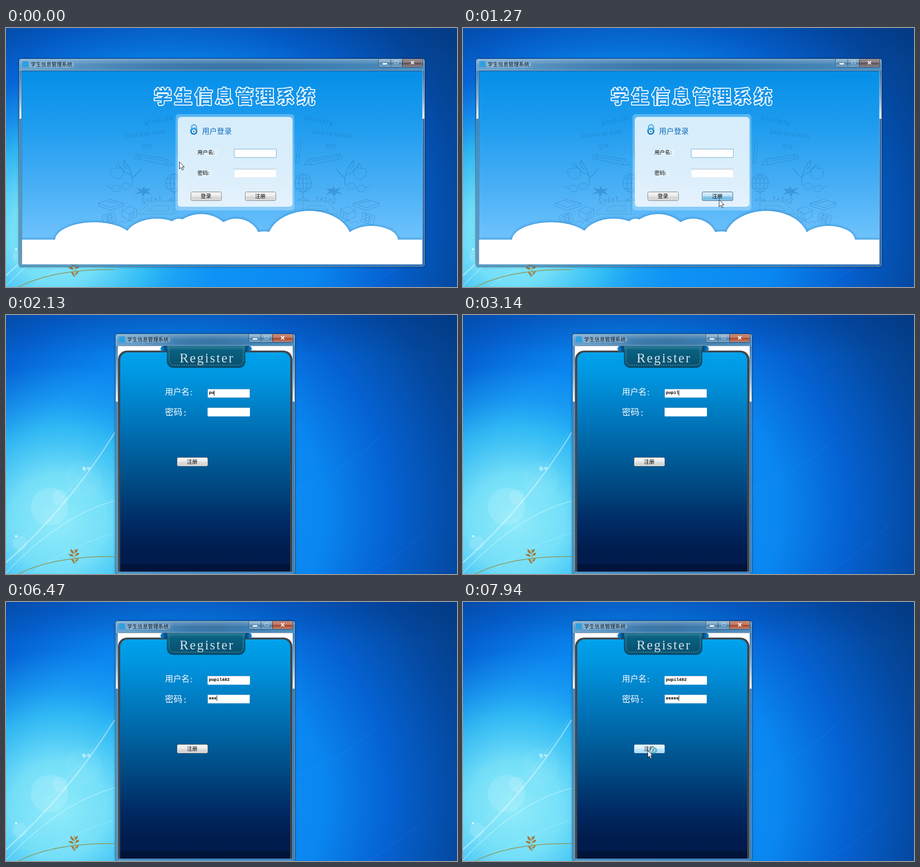
Animation, 987 px wide and 568 px high, one loop 8000 ms. Source, as an HTML page with a canvas:

```html
<!DOCTYPE html>
<html lang="zh">
<head>
<meta charset="utf-8">
<style>
html, body { margin: 0; width: 987px; height: 568px; overflow: hidden; }
canvas { display: block; }
</style>
</head>
<body>
<canvas id="stage" width="987" height="568"></canvas>
<script>
const c = document.getElementById('stage').getContext('2d');
const LOOP = 8000, SWITCH = 1340, TAB = 5310, BLINK = 530;
const CJK = '"Noto Sans CJK SC", "Noto Sans CJK", sans-serif';
const APP = '学生信息管理系统', USER = 'pupil482';
const userKeys = [1960, 2130, 2740, 2970, 3140, 4680, 4910, 5140];
const passKeys = [6180, 6320, 6470, 6720, 6850];
// time, x, y of the pointer tip
const path = [[70, 379, 293], [150, 370, 286], [300, 396, 270], [500, 480, 320], [700, 556, 374],
  [780, 560, 376], [1440, 560, 376], [1660, 592, 330], [1960, 548, 239], [2750, 548, 239],
  [7400, 607, 307], [7820, 404, 325]];

function shade(g, stops) {
  stops.forEach(([at, color]) => g.addColorStop(at, color));
  return g;
}
const vertical = (y0, y1, ...stops) => shade(c.createLinearGradient(0, y0, 0, y1), stops);
const horizontal = (x0, x1, ...stops) => shade(c.createLinearGradient(x0, 0, x1, 0), stops);
const radial = (x, y, r, ...stops) => shade(c.createRadialGradient(x, y, 0, x, y, r), stops);

function rect(x, y, w, h, fill) {
  c.fillStyle = fill;
  c.fillRect(x, y, w, h);
}
function box(x, y, w, h, r, fill, stroke) {
  c.beginPath();
  c.roundRect(x, y, w, h, r);
  if (fill) { c.fillStyle = fill; c.fill(); }
  if (stroke) { c.strokeStyle = stroke; c.lineWidth = 1; c.stroke(); }
}
function text(s, x, y, font, color, align = 'left') {
  c.font = font;
  c.fillStyle = color;
  c.textAlign = align;
  c.textBaseline = 'middle';
  c.fillText(s, x, y);
}
function line(d, color, width = 1) {
  c.strokeStyle = color;
  c.lineWidth = width;
  c.stroke(new Path2D(d));
}
function disc(x, y, r, fill) {
  c.beginPath();
  c.arc(x, y, r, 0, 7);
  c.fillStyle = fill;
  c.fill();
}

function desktop() {
  rect(0, 0, 987, 568, radial(360, 430, 800, [0, '#129df8'], [.42, '#0a86f0'], [.6, '#0562d2'],
    [.8, '#04489f'], [1, '#053878']));
  rect(0, 0, 987, 568, radial(115, 455, 350, [0, 'rgba(150,240,250,.95)'], [.3, 'rgba(125,230,249,.92)'],
    [.6, 'rgba(60,200,245,.75)'], [.8, 'rgba(40,175,245,.4)'], [1, 'rgba(40,165,245,0)']));
  rect(0, 0, 987, 90, vertical(0, 90, [0, 'rgba(0,50,130,.25)'], [1, 'rgba(0,50,130,0)']));
  [[95, 420, 41], [118, 400, 17], [30, 500, 16], [170, 360, 40]].forEach(([x, y, r], i) =>
    disc(x, y, r, `rgba(255,255,255,${i < 3 ? .13 : .04})`));
  disc(22, 485, 2, '#fff');
  for (let i = 0; i < 22; i++) disc(i * 61 % 235, 395 + i * 47 % 120, .7, 'rgba(255,255,255,.5)');
  const beam = 'M0 543Q138 420 238 258';
  line(beam, 'rgba(255,255,255,.22)', 4);
  line(beam, 'rgba(255,255,255,.4)', 1.2);
  line('M0 520Q150 390 230 258', 'rgba(255,255,255,.18)');
  line('M0 566Q120 438 238 408', 'rgba(255,255,255,.4)', 1.3);
  line('M60 566Q130 510 238 478', 'rgba(255,255,255,.3)');
  line('M634 381Q750 340 822 262M790 568Q890 510 930 460', 'rgba(90,190,255,.18)');
  c.fillStyle = 'rgba(235,255,255,.5)';
  c.fill(new Path2D('M167 333Q176 330 175 341Q166 344 167 333M176 336Q184 329 185 338Q180 342 176 336'));
  line('M25 569Q105 528 238 530', '#8d9c62', 1.6);
  line('M150 512L152 545', '#a08a45');
  c.fillStyle = '#a8763a';
  c.fill(new Path2D('M149 524Q140 522 141 513Q148 516 149 524M151 522Q150 514 157 513Q158 519 151 522' +
    'M148 530Q140 530 137 525Q146 522 148 530M152 528Q154 520 160 522Q159 528 152 528' +
    'M149 541Q144 540 142 535Q150 535 149 541M152 541Q153 535 159 533Q158 540 152 541M150 546Q145 542 145 539Q152 541 150 546'));
}

// Glass window frame with caption and its three buttons
function frame(x, y, w, h, shineY, closeTop, closeBottom) {
  c.save();
  c.shadowColor = 'rgba(0,15,50,.45)';
  c.shadowBlur = 6;
  box(x, y, w, h, 6, 'rgba(60,125,180,.6)');
  c.restore();
  c.save();
  box(x, y, w, h, 6);
  c.clip();
  rect(x, y, w, 27, horizontal(x, x + w, [0, '#6aa3cf'], [.25, '#4a86b6'], [.4, '#3c7aac'],
    [.55, '#3a76a6'], [.7, '#3d7cae'], [1, '#4c8cbe']));
  rect(x, y, w, 12, vertical(y, y + 12, [0, 'rgba(255,255,255,.28)'], [1, 'rgba(255,255,255,.04)']));
  const shine = vertical(y + 26, shineY, [0, 'rgba(255,255,255,.05)'], [.6, 'rgba(255,255,255,.45)'], [1, 'rgba(255,255,255,.95)']);
  rect(x, y + 26, 7, shineY - y - 26, shine);
  rect(x + w - 7, y + 26, 7, shineY - y - 26, shine);
  c.shadowColor = 'rgba(205,228,245,.6)';
  c.shadowBlur = 10;
  box(x + 24, y + 8, 96, 11, 5, 'rgba(195,222,242,.4)');
  c.restore();
  box(x + .5, y + .5, w - 1, h - 1, 6, null, '#1c3d5e');
  box(x + 1.5, y + 1.5, w - 3, h - 3, 5, null, 'rgba(225,245,255,.6)');
  box(x + 5.5, y + 25.5, w - 11, h - 31, 1, null, 'rgba(215,240,255,.55)');
  box(x + 6.5, y + 26.5, w - 13, h - 33, 0, null, '#2c5a84');
  box(x + 8, y + 6, 13, 13, 2, '#2f9fe0');
  text(APP, x + 26, y + 13, '11.4px ' + CJK, '#05101c');

  const bx = x + w - 101.5, by = y + .5;
  const glass = vertical(by, by + 18, [0, '#9dbfda'], [.45, '#7ba6c8'], [.5, '#4f80a8'], [1, '#74a8cc']);
  box(bx, by, 96, 18, [0, 0, 4, 4], glass, '#26486a');
  box(bx + 52, by, 44, 18, [0, 0, 4, 0], vertical(by, by + 18, [0, closeTop], [.45, closeTop], [.5, closeBottom], [1, closeTop]), '#2d2630');
  rect(bx + 26, by + .5, 1, 17, '#2c4f70');
  box(bx + 1, by + 1, 94, 16, [0, 0, 3, 3], null, 'rgba(255,255,255,.38)');
  rect(bx + 8.5, by + 9.5, 10, 3, '#fff');
  c.strokeStyle = '#c9dce9';
  c.strokeRect(bx + 35, by + 5, 8, 6);
  line(`M${bx + 70.5} ${by + 5}l7 7m0 -7l-7 7`, '#fff', 2);
}

function field(x, y, focus = 0) {
  box(x + .5, y + .5, 92, 18.5, 1, '#fff', '#dfeaf2');
  rect(x, y, 93, 1, '#a4b6c4');
  if (focus) {
    c.globalAlpha = focus;
    box(x + .5, y + .5, 92, 18.5, 1, null, '#6ea9d3');
    c.globalAlpha = 1;
  }
}
function button(label, x, y, hover = 0, press = 0) {
  const layers = [
    [1, '#707070', '#f4f4f4', '#ececec', '#dddddd', '#cfcfcf'],
    [hover, '#3c7fb1', '#eaf6fd', '#d9f0fc', '#bee6fd', '#a7d9f5'],
    [press, '#1c4f7c', '#dcf0fa', '#c0e3f6', '#91cdee', '#67b2dd']];
  for (const [alpha, edge, ...tones] of layers) {
    c.globalAlpha = alpha;
    box(x + .5, y + .5, 67, 19, 3, vertical(y, y + 20, [0, tones[0]], [.49, tones[1]], [.5, tones[2]], [1, tones[3]]), edge);
    box(x + 1.5, y + 1.5, 65, 17, 2, null, 'rgba(255,255,255,.65)');
  }
  c.globalAlpha = 1;
  text(label, x + 33.5, y + 10, '11.5px ' + CJK, '#000', 'center');
}

// One half of the faint school sketches; the other half is its mirror image
function doodles() {
  const ink = 'rgba(20,92,158,.34)';
  const write = (s, x, y, angle, size) => {
    c.save();
    c.translate(x, y);
    c.rotate(angle);
    text(s, 0, 0, `${size}px "Open Sans", sans-serif`, ink, 'center');
    c.restore();
  };
  write('a.b.c.d.e.f.g', 684, 203, .2, 12);
  write('BACK TO SCHOOL', 716, 234, .12, 11);
  write('XYZ', 710, 261, .15, 13);
  write('1+1=2', 699, 378, .12, 16);
  line('M634 296L640 246Q643 240 646 247L640 296ZM636 280H642', ink);
  line('M652 300L664 288L732 276L736 286L668 300ZM664 288L668 300M670 292L732 281M724 278L727 288', ink);
  line('M742 344Q738 318 760 290M742 330Q728 316 722 308M744 322Q762 318 774 296M760 290Q764 304 752 309', ink, 1.4);
  line('M776 308Q756 302 762 322Q770 338 786 326Q796 306 776 308Q776 300 782 296', ink);
  line('M746 346a9 7 0 1 0 18 2a9 7 0 1 0 -18 -2M768 351a9 7 0 1 0 18 2a9 7 0 1 0 -18 -2M786 352L798 346', ink);
  line('M632 340a18 20 0 1 0 36 0a18 20 0 1 0 -36 0M650 320V360M634 330H666M632 341H668M635 352H665M641 340a9 20 0 1 0 18 0a9 20 0 1 0 -18 0M650 360V374M638 378Q650 370 662 378Z', ink, 1.2);
  c.fillStyle = 'rgba(20,92,158,.3)';
  c.fill(new Path2D('M700 352L713 353L716 347L720 354L734 350L725 358L738 365L722 362L718 371L713 362L700 366L708 358Z'));
  line('M760 384L790 376L816 384L790 394ZM760 384V390L790 400L816 390V384M772 384L796 380', ink);
  line('M650 380H704L728 408H650ZM662 390H694L706 401H662Z', 'rgba(75,130,120,.4)');
  line('M732 398L748 391L764 400L748 408ZM732 398V414L748 422V408M764 400V414L748 422M738 402V417M743 405V420', ink);
  line('M782 404L808 412L802 432L776 424ZM784 409L803 415M782 414L801 420M780 419L799 425M789 407L785 426M797 409L792 429', ink);
  line('M738 426Q748 418 756 428Q766 420 772 428', ink);
}

function loginScene(t) {
  frame(28, 67, 889, 457, 199, '#8d8488', '#5f4c53');
  c.save();
  c.beginPath();
  c.rect(35, 95, 876, 423);
  c.clip();
  rect(35, 95, 876, 423, vertical(95, 465, [0, '#058fe8'], [.3, '#1c9bee'], [.7, '#4bb0f5'], [1, '#6fc3fc']));
  doodles();
  c.save();
  c.translate(1018, 0);
  c.scale(-1, 1);
  doodles();
  c.restore();

  const clouds = [[193, 86, 40], [330, 72, 48], [378, 30, 48], [427, 68, 58], [504, 52, 48],
    [565, 40, 20], [664, 92, 65], [800, 58, 32]];
  const sky = new Path2D();
  sky.rect(20, 464, 910, 70);
  for (const [x, rx, ry] of clouds) {
    sky.moveTo(x + rx, 466);
    sky.ellipse(x, 466, rx, ry, 0, 0, 2 * Math.PI);
  }
  c.save();
  c.shadowColor = 'rgba(0,85,165,.65)';
  c.shadowBlur = 7;
  c.fillStyle = '#fff';
  c.fill(sky);
  c.restore();
  c.restore();

  c.lineJoin = 'round';
  [...APP].forEach((ch, i) => {
    const x = 343 + i * 44.8;
    c.font = 'bold 40px ' + CJK;
    c.textAlign = 'center';
    c.textBaseline = 'middle';
    c.strokeStyle = '#fff';
    c.lineWidth = 4;
    c.strokeText(ch, x, 150);
    text(ch, x, 150, c.font, '#1593e8', 'center');
  });

  box(371, 189, 260, 211, 7, 'rgba(255,255,255,.28)');
  box(376, 195, 251, 197, 7, vertical(195, 392, [0, '#d6edfb'], [.6, '#dbeefb'], [1, '#e4f2fd']));
  line('M406 222V216Q411 208 417 216V222', '#58aede', 2.4);
  disc(411, 226, 8, vertical(217, 234, [0, '#4db8ec'], [1, '#0c6cb8']));
  disc(411, 227, 4, '#fff');
  disc(411, 227, 1.8, '#0d70bb');
  text('用户登录', 429, 226, '500 16.3px ' + CJK, '#0b6cbb');
  rect(419, 267, 44, 13, 'rgba(255,255,255,.25)');
  rect(419, 312, 32, 13, 'rgba(255,255,255,.25)');
  text('用户名:', 419, 273, '11.5px ' + CJK, '#000');
  text('密码:', 419, 318, '11.5px ' + CJK, '#000');
  field(499, 265, 1);
  field(499, 309);
  button('登录', 404, 359);
  button('注册', 523, 359, fade(t, 690, 200), fade(t, 890, 150));
}

function registerScene(t) {
  frame(239, 41, 394, 528, 190, '#c5806c', '#a5452a');
  rect(245, 68, 382, 495, '#fff');
  box(245, 78, 382, 485, [20, 20, 0, 0], '#41474c');
  box(250, 82, 372, 481, [16, 16, 0, 0], vertical(82, 563, [0, '#00a2ec'], [.1, '#0097e1'],
    [.35, '#0070b4'], [.55, '#00528c'], [.78, '#002a63'], [.9, '#001c4e'], [.965, '#001b4c'], [.966, '#00143b'], [1, '#00143b']));

  box(338, 68, 200, 12, 6, horizontal(338, 538, [0, '#0a8ede'], [.07, '#053c6c'], [.93, '#053c6c'], [1, '#0a8ede']));
  box(352, 68, 172, 48, [0, 0, 14, 14], vertical(68, 116, [0, '#2f7f9a'], [.2, '#0a6080'], [1, '#064e6d']));
  c.setLineDash([3, 2]);
  line('M357 72V99Q357 110 368 110H508Q519 110 519 99V72', 'rgba(175,215,228,.7)');
  c.setLineDash([]);
  c.letterSpacing = '2.9px';
  c.textBaseline = 'alphabetic';
  c.textAlign = 'left';
  c.font = '29px "Liberation Serif", serif';
  c.fillStyle = '#d3e2e9';
  c.fillText('Register', 380, 104);
  c.letterSpacing = '0px';

  const light = '300 17.9px ' + CJK, larger = '300 19px ' + CJK;
  text('用户名', 348, 168, light, '#fff');
  text(':', 403, 169, light, '#fff');
  text('密码', 348, 213, larger, '#fff');
  text(':', 389, 214, larger, '#fff');
  const moved = fade(t, TAB, 220);
  field(441, 162, 1 - moved);
  field(441, 203, moved);
  button('注册', 374, 312, fade(t, 7760, 150));

  const typed = keys => keys.filter(k => k <= t).length;
  const users = typed(userKeys), stars = typed(passKeys), step = 5.67;
  for (let i = 0; i < users; i++)
    text(USER[i], 444 + i * step, 171, 'bold 9.6px "Liberation Mono", monospace', '#000');
  for (let i = 0; i < stars; i++) {
    const x = 446.6 + i * step;
    line(`M${x} 208.5v5.5M${x - 2.4} 209.7l4.8 3.1m0 -3.1l-4.8 3.1`, '#000', 1.1);
  }
  const lastKey = Math.max(...[SWITCH, ...userKeys, TAB, ...passKeys].filter(k => k <= t));
  if (Math.floor((t - lastKey) / BLINK) % 2 === 0) {
    const inPass = t >= TAB;
    rect(Math.round(444 + (inPass ? stars : users) * step), inPass ? 205 : 165, 1, 12, '#000');
  }
}

function pointer(t) {
  const hidden = t >= 1960 && t < 2510 || t >= 2740 && t < 7400;
  if (hidden) return;
  const s = 70 + Math.floor((t - 70) / 79) * 79;
  let [, x, y] = path[0];
  path.forEach(([t1, x1, y1], i) => {
    if (!i || s < path[i - 1][0]) return;
    const [t0, x0, y0] = path[i - 1], k = Math.min(1, (s - t0) / (t1 - t0));
    x = x0 + (x1 - x0) * k;
    y = y0 + (y1 - y0) * k;
  });
  c.save();
  c.translate(Math.round(x) + .5, Math.round(y) + .5);
  if (t >= SWITCH) {
    const turn = t / 150;
    const ring = (from, to, color, width) => {
      c.beginPath();
      c.arc(13, 0, 5.4, from, to);
      c.strokeStyle = color;
      c.lineWidth = width;
      c.stroke();
    };
    ring(0, 7, '#17708f', 3.4);
    ring(0, 7, '#79cfe2', 2);
    ring(turn, turn + 2.2, '#e8fbff', 2);
  }
  const arrow = new Path2D('M0 0V15.5L3.5 12.3L6 18L8.6 17L6.2 11.3H10.8Z');
  c.fillStyle = '#fff';
  c.fill(arrow);
  c.strokeStyle = '#111a28';
  c.lineWidth = 1;
  c.stroke(arrow);
  c.restore();
}

function fade(t, start, length) {
  return Math.max(0, Math.min(1, (t - start) / length));
}

let begin;
function draw(now) {
  begin ??= now;
  const t = (now - begin) % LOOP;
  desktop();
  (t < SWITCH ? loginScene : registerScene)(t);
  pointer(t);
  requestAnimationFrame(draw);
}
requestAnimationFrame(draw);
</script>
</body>
</html>
```
